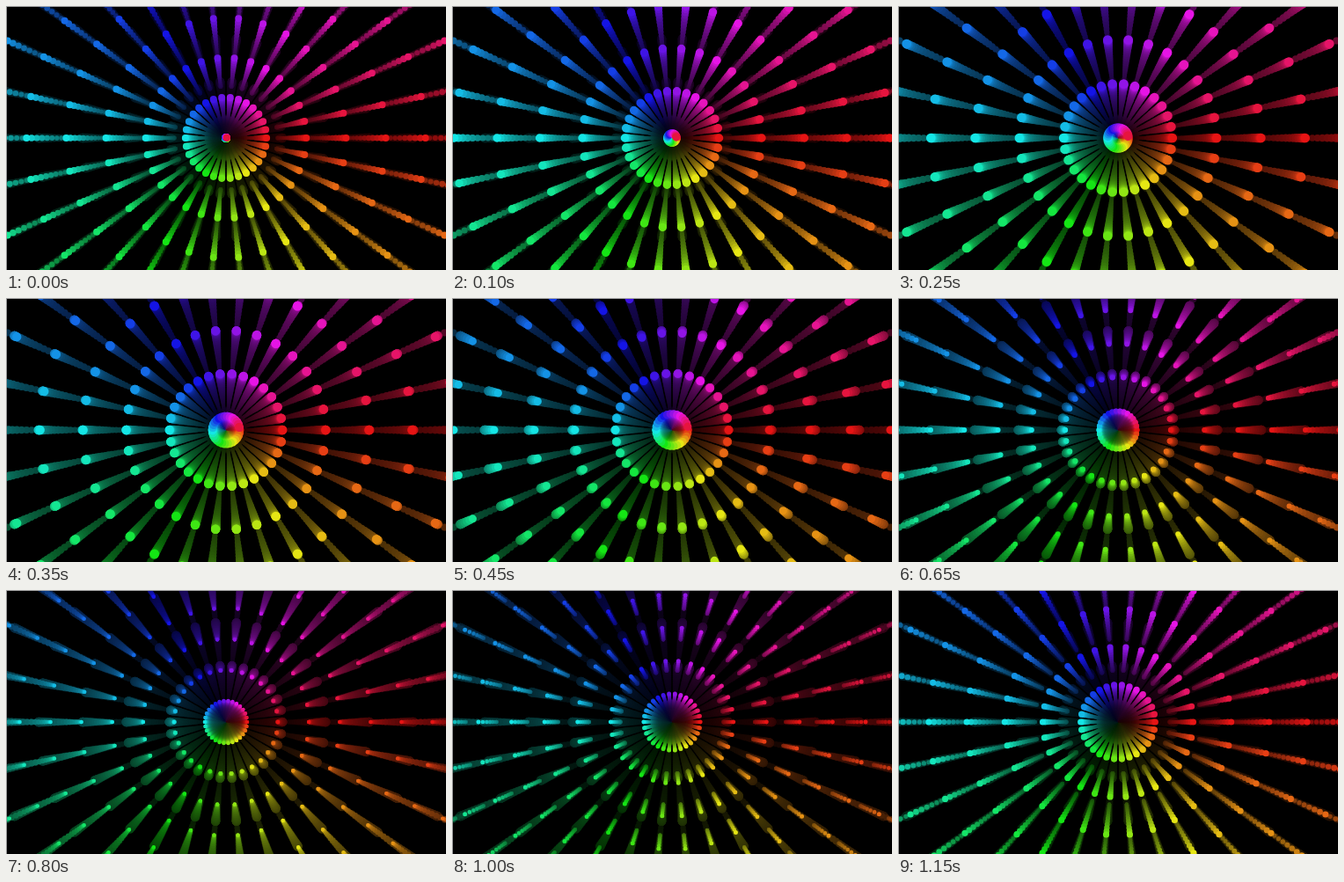
Write an HTML page with a canvas that moves like this. It is 500 by 300 pixels and loops after 1.2 s.

```html
<!DOCTYPE html>
<html lang="en">
<head>
<meta charset="utf-8">
<title>Pulsing colour spokes</title>
<style>
  html, body { margin: 0; width: 100%; height: 100%; overflow: hidden; background: #000; }
  canvas { display: block; }
</style>
</head>
<body>
<canvas id="stage" width="500" height="300"></canvas>
<script>
const W = 500, H = 300, CX = 250, CY = 150;
const LOOP = 1200, STEP = 50, TICK = 25;
const SPOKES = 30, RINGS = 9, TRAIL = 60;
const TAU = Math.PI * 2;

const ctx = document.getElementById('stage').getContext('2d');

const wave = (ms, peak) => Math.cos(TAU * (ms - peak) / LOOP);
const spacing = ms => 42.6 + 7.7 * wave(ms, 236);
const dotSize = ms => 3.7 + 1.6 * wave(ms, 262);

// Trails drop quickly behind the head, then linger.
const glow = age => 0.42 * 0.8 ** age + 0.58 * 0.96 ** age;

const spokes = Array.from({ length: SPOKES }, (_, i) => {
  const a = TAU * i / SPOKES;
  return { hue: 360 * i / SPOKES, x: Math.cos(a), y: Math.sin(a) };
});

// All dots of one moment, dimmed by their age.
function drawDots(ms, light) {
  const gap = spacing(ms), size = dotSize(ms);
  const phase = (((ms / LOOP + 0.022) % 1) + 1) % 1;
  for (const s of spokes) {
    ctx.fillStyle = `hsl(${s.hue}, 84%, ${49 * light}%)`;
    ctx.beginPath();
    for (let k = 0; k < RINGS; k++) {
      const r = (k + phase) * gap;
      const x = CX + s.x * r, y = CY + s.y * r;
      if (x < -size || x > W + size || y < -size || y > H + size) break;
      ctx.moveTo(x + size, y);
      ctx.arc(x, y, size, 0, TAU);
    }
    ctx.fill();
  }
}

function draw(ms) {
  ctx.fillStyle = '#000';
  ctx.fillRect(0, 0, W, H);
  for (let age = TRAIL; age >= 0; age--) drawDots(ms - age * TICK, glow(age));
  ctx.fillStyle = '#aaa';
  ctx.fillRect(0, 0, W, 1);
  ctx.fillRect(0, 0, 1, H);
}

const start = performance.now();
let shown = -1;

function tick() {
  const step = Math.floor(((performance.now() - start) % LOOP) / STEP);
  if (step !== shown) {
    shown = step;
    draw(step * STEP);
  }
  requestAnimationFrame(tick);
}
tick();
</script>
</body>
</html>
```
